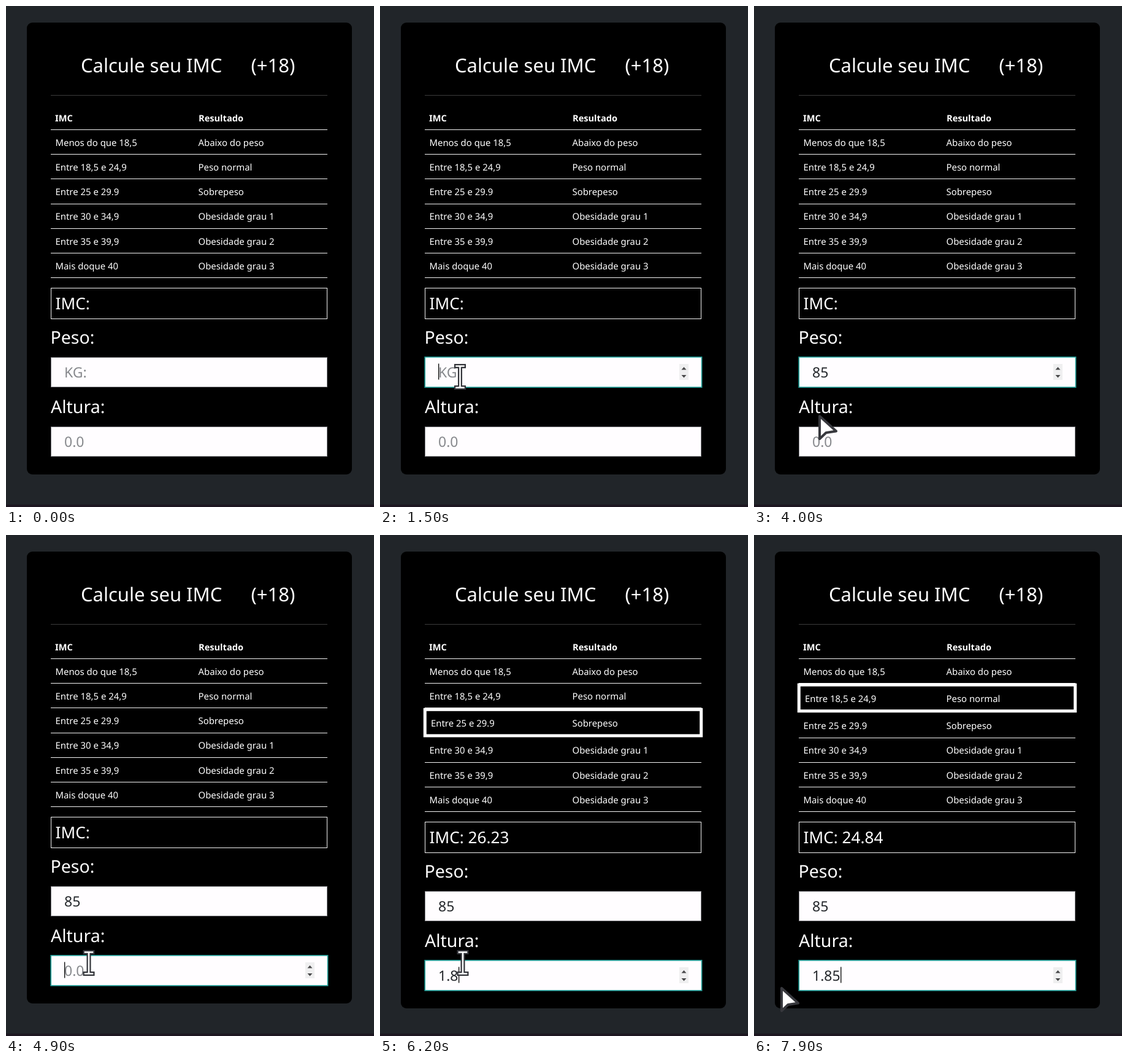
An HTML page that plays this animation: 600x816 px, repeating every 8000 ms.

```html
<!DOCTYPE html>
<html lang="pt-BR">
<head>
<meta charset="utf-8">
<title>Calcule seu IMC</title>
<style>
  html, body { margin: 0; width: 100%; height: 100%; overflow: hidden; background: #212529; }
  svg { display: block; width: 100vw; height: 100vh; }
  text { font-family: "Noto Sans", "Open Sans", sans-serif; fill: #fff; white-space: pre; text-rendering: geometricPrecision; }
  .light { font-weight: 300; }
  .cell { font-size: 14.9px; }
  .head { font-size: 14.6px; font-weight: 600; }
  .label { font-size: 28.5px; }
  .field { font-size: 23px; }
</style>
</head>
<body>
<svg id="stage" viewBox="0 0 600 816" xmlns="http://www.w3.org/2000/svg"></svg>
<script>
const stage = document.getElementById('stage');
const LOOP = 8000, TICK = 100, GROW = 8;

function add(parent, tag, attrs, text) {
  const node = document.createElementNS('http://www.w3.org/2000/svg', tag);
  set(node, attrs);
  if (text) node.textContent = text;
  parent.appendChild(node);
  return node;
}
function set(node, attrs) {
  for (const key in attrs) node.setAttribute(key, attrs[key]);
}
const show = (node, on) => node.setAttribute('visibility', on ? 'visible' : 'hidden');
const shift = (node, x, y) => node.setAttribute('transform', `translate(${x} ${y})`);
const label = (parent, cls, x, y, text) => add(parent, 'text', { class: cls, x, y }, text);
const rule = (parent, y, fill) => add(parent, 'rect', { x: 73, y, width: 451, height: 1, fill });

add(stage, 'rect', { y: 812, width: 600, height: 4, fill: '#1d1721' });
const card = add(stage, 'rect', { x: 34, y: 27, width: 530, rx: 9, fill: '#000' });

set(label(stage, 'light', 122, 108, 'Calcule seu IMC'), { 'font-size': 31 });
set(label(stage, 'light', 399.5, 108, '(+18)'), { 'font-size': 31 });
rule(stage, 145, '#3c3c3c');

label(stage, 'head', 80, 187.5, 'IMC');
label(stage, 'head', 314, 187.5, 'Resultado');
rule(stage, 201, '#f4f4f4');

const PITCH = 40.2;
const rows = [
  ['Menos do que 18,5', 'Abaixo do peso'],
  ['Entre 18,5 e 24,9', 'Peso normal'],
  ['Entre 25 e 29.9', 'Sobrepeso'],
  ['Entre 30 e 34,9', 'Obesidade grau 1'],
  ['Entre 35 e 39,9', 'Obesidade grau 2'],
  ['Mais doque 40', 'Obesidade grau 3']
].map(([range, result], i) => {
  const g = add(stage, 'g', {});
  const top = 201 + i * PITCH;
  const first = label(g, 'cell', 80.5, top + 26.7, range);
  label(g, 'cell', 313.5, top + 26.7, result);
  const line = rule(stage, Math.round(top + PITCH), '#f4f4f4');
  return { g, first, line };
});
const frame = add(stage, 'rect', { x: 73.3, width: 450.4, height: 42.6, fill: 'none', stroke: '#fff', 'stroke-width': 5 });

const form = add(stage, 'g', {});
add(form, 'rect', { x: 73.5, y: 459.5, width: 450, height: 50, fill: 'none', stroke: '#f4f4f4' });
const score = label(form, 'light', 80.5, 494, '');
set(score, { 'font-size': 26.2 });
label(form, 'light label', 72.5, 550, 'Peso:');
label(form, 'light label', 73, 663, 'Altura:');

function makeField(y, hint) {
  const g = add(form, 'g', {});
  shift(g, 0, y);
  const box = add(g, 'rect', { fill: '#fffdff' });
  const text = label(g, 'light field', 95, 32.5, '');
  const spin = add(g, 'g', {});
  add(spin, 'rect', { x: 488, y: 11, width: 15, height: 26, fill: '#efeff0' });
  add(spin, 'path', { d: 'M491.5 20.5l4-4.5 4 4.5zM491.5 29l4 4.5 4-4.5z', fill: '#48484a' });
  const caret = add(g, 'rect', { y: 10.5, width: 1.3, height: 26, fill: '#000' });
  return { y, hint, box, text, spin, caret };
}
const weight = makeField(572, 'KG:');
const height = makeField(685, '0.0');

function drawField(f, value, focus, hover, caretOn) {
  set(f.box, focus
    ? { x: 73.2, y: -0.2, width: 451.4, height: 49.2, stroke: '#239e98', 'stroke-width': 1.7 }
    : { x: 73.5, y: 0.5, width: 450, height: 48, stroke: '#85858a', 'stroke-width': 1 });
  f.text.textContent = value || f.hint;
  f.text.style.fill = value ? '#24272b' : '#86888c';
  show(f.spin, focus || hover);
  show(f.caret, focus && caretOn);
  f.caret.setAttribute('x', value ? 95.5 + f.text.getComputedTextLength() : 95);
}

// Pointers
const arrow = add(stage, 'path', {
  d: 'M2 4V41L12.500 31 29 28.500Z', fill: '#fff', stroke: '#37383d', 'stroke-width': 4, 'stroke-linejoin': 'round'
});
const beam = add(stage, 'g', { fill: 'none', 'stroke-linecap': 'square' });
const beamPath = 'M-6 -17.500H6M-6 17.500H6M0 -17.500V17.500';
add(beam, 'path', { d: beamPath, stroke: '#33343a', 'stroke-width': 7 });
add(beam, 'path', { d: beamPath, stroke: '#fff', 'stroke-width': 2.6 });

// [time, x, y]
const path = [
  [100, 165, 699], [600, 132, 613], [900, 130.5, 607.5], [1100, 130.5, 604],
  [3700, 130.5, 604], [4000, 105, 664], [4300, 116, 690], [4600, 135, 697],
  [7100, 135, 697], [7800, 43, 734]
];
// [time, value]
const weightKeys = [[0, ''], [2800, '8'], [3000, '85']];
const heightKeys = [[0, ''], [5300, '1'], [5600, '1.'], [5900, '1.8'], [6500, '1.85']];
const focusKeys = [[0, null], [1300, weight], [4700, height]];
const caretKeys = [
  [0, false], [1300, true], [1900, false], [2500, true], [3600, false], [4200, true],
  [7000, false], [7600, true]
];
const limits = [18.5, 25, 30, 35, 40];

const at = (keys, t) => keys.filter(k => k[0] <= t).pop()[1];

function pointer(t) {
  const i = path.findIndex(p => p[0] > t);
  if (i < 0) return path[path.length - 1].slice(1);
  if (i === 0) return path[0].slice(1);
  const [t0, x0, y0] = path[i - 1], [t1, x1, y1] = path[i];
  const k = (t - t0) / (t1 - t0), e = k * k * (3 - 2 * k);
  return [x0 + (x1 - x0) * e, y0 + (y1 - y0) * e];
}

function draw(t) {
  const kg = at(weightKeys, t), m = at(heightKeys, t);
  const bmi = kg && m ? kg / parseFloat(m) ** 2 : 0;
  const hit = bmi ? limits.filter(v => bmi >= v).length : -1;
  const grow = bmi ? GROW : 0;

  card.setAttribute('height', 736 + grow);
  rows.forEach(({ g, first, line }, i) => {
    const past = hit >= 0 && i > hit;
    shift(g, 0, past ? GROW : i === hit ? GROW / 2 : 0);
    first.setAttribute('x', i === hit ? 83 : 80.5);
    shift(line, 0, hit >= 0 && i >= hit ? GROW : 0);
    show(line, i !== hit || i === rows.length - 1);
  });
  show(frame, hit >= 0);
  frame.setAttribute('y', 203.9 + Math.max(hit, 0) * PITCH);

  shift(form, 0, grow);
  score.textContent = bmi ? 'IMC: ' + bmi.toFixed(2) : 'IMC:';

  const [x, y] = pointer(t), visible = t >= 100;
  const over = f => visible && x > 73 && x < 524 && y > f.y + grow && y < f.y + grow + 49;
  const focus = at(focusKeys, t), caretOn = at(caretKeys, t);
  drawField(weight, kg, focus === weight, over(weight), caretOn);
  drawField(height, m, focus === height, over(height), caretOn);

  const typing = over(weight) || over(height);
  show(beam, visible && typing);
  show(arrow, visible && !typing);
  shift(beam, x, y);
  shift(arrow, x, y);
}

const start = performance.now();
function run() {
  const t = (performance.now() - start) % LOOP;
  draw(Math.floor(t / TICK) * TICK);
  requestAnimationFrame(run);
}
run();
</script>
</body>
</html>
```
